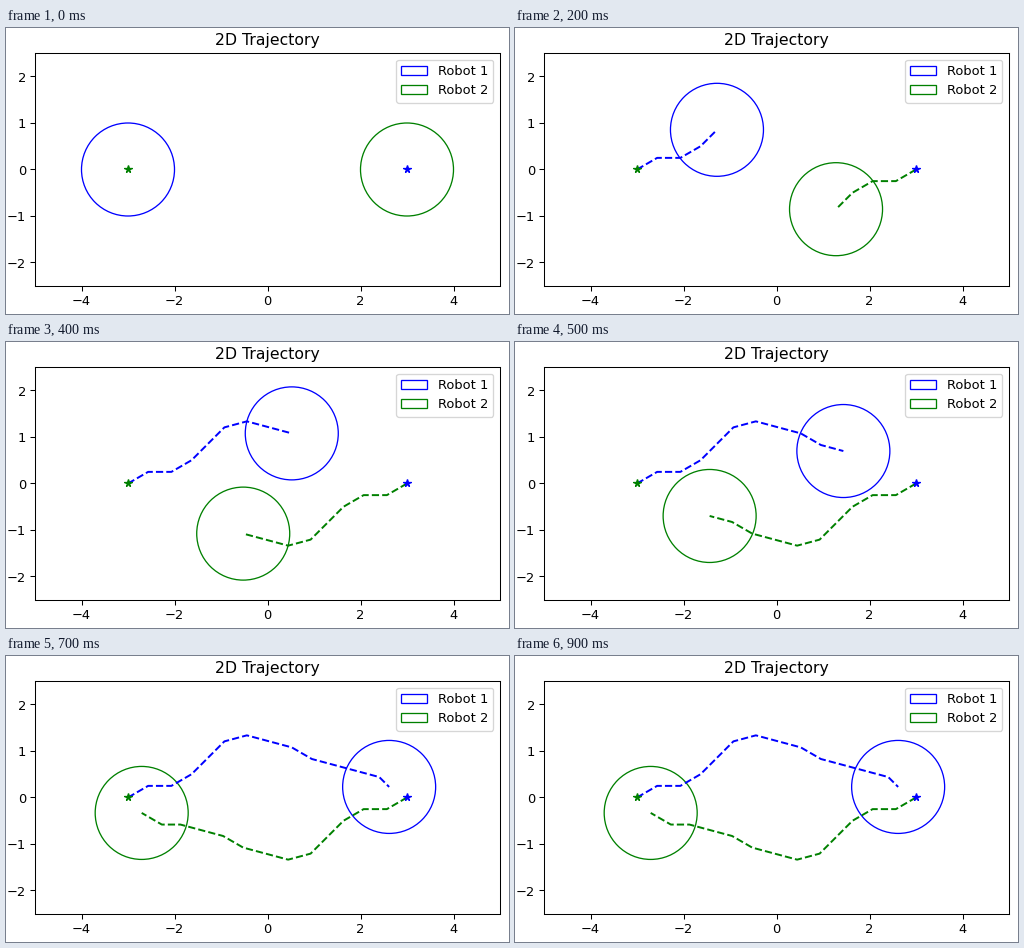
These frames come from a looping animation (503 by 286 pixels, 1 s). A matplotlib script:

```python
import matplotlib.pyplot as plt
import numpy as np
from matplotlib.animation import FuncAnimation

W, H, DPI = 503, 286, 93.75
FRAMES, INTERVAL = 10, 100
STEPS_PER_FRAME = 2
LEFT, CENTER_Y, UNIT = 29, 141.5, 46.5  # axes placement in pixels

CRUISE = 0.5                   # distance per step
TURN = np.radians(15)          # headings are whole multiples of this
DODGE = [2, 0, 2, 3, 3, 1, -1, -1, -2, -1]
LEGEND_CORNER = (2.75, 1.4)    # lower left of the legend's usual place


def drive(side, headings, end_speeds):
    """Path from (-3, 0), or from (3, 0) half a turn round for side -1."""
    angles = TURN * np.array(DODGE + headings)
    speeds = np.full(len(angles), CRUISE)
    speeds[-len(end_speeds):] = end_speeds
    moves = speeds * np.array([np.cos(angles), np.sin(angles)])
    path = np.cumsum(np.column_stack([(-3, 0), moves]), axis=1)
    return side * path.T


fig = plt.figure(figsize=((W + 1e-6) / DPI, (H + 1e-6) / DPI), dpi=DPI)
bottom = H - CENTER_Y - 2.5 * UNIT
ax = fig.add_axes([LEFT / W, bottom / H, 10 * UNIT / W, 5 * UNIT / H])
ax.set(xlim=(-5, 5), ylim=(-2.5, 2.5), xticks=range(-4, 5, 2),
       yticks=range(-2, 3))
ax.set_title("2D Trajectory")


def add_robot(path, color, label):
    body = ax.add_patch(plt.Circle(path[0], 1, fill=False, edgecolor=color,
                                   label=label))
    trail, = ax.plot([], [], color + "--")
    ax.plot(*-path[0], color + "*", zorder=3)
    return path, body, trail


robots = [
    add_robot(drive(1, [-1, -1, -3], [0.3]), "b", "Robot 1"),
    add_robot(drive(-1, [-1, 0, -2], [0.45, 0.4, 0.5]), "g", "Robot 2"),
]
bodies = [body for _, body, _ in robots]


def covers_legend(body):
    return np.all(np.add(body.center, body.radius) > LEGEND_CORNER)


def update(frame):
    for path, body, trail in robots:
        step = min(frame * STEPS_PER_FRAME, len(path) - 1)
        body.center = path[step]
        trail.set_data(*path[:step + 1].T)
    blocked = any(covers_legend(body) for body in bodies)
    # Only the very start has a robot this far right without reaching the top.
    ax.legend(handles=bodies, loc="upper left" if blocked else "upper right")


anim = FuncAnimation(fig, update, frames=FRAMES, interval=INTERVAL,
                     init_func=lambda: update(0), repeat=True)
plt.show()
```
